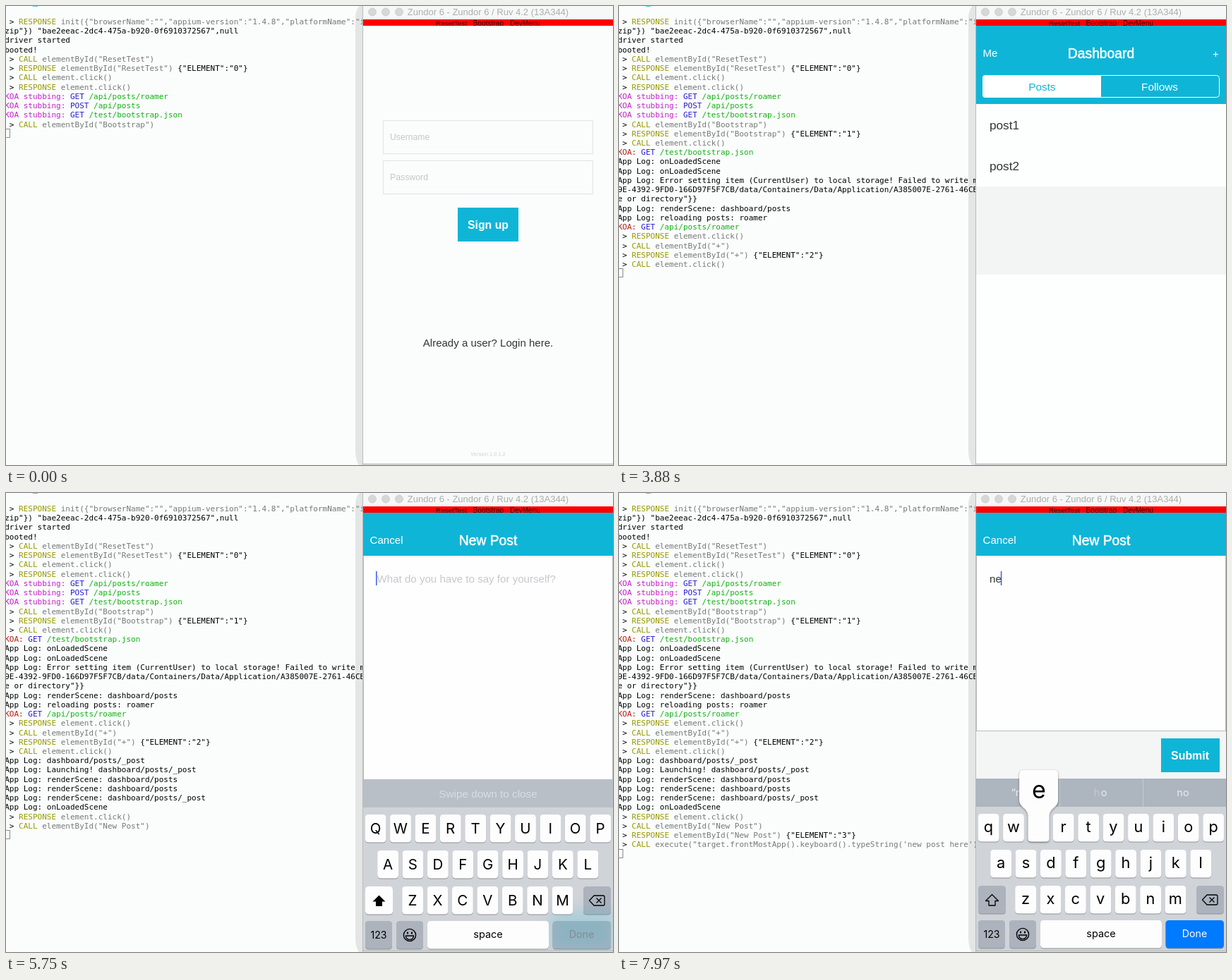
Write an HTML page with a canvas that moves like this. It is 860 px wide and 651 px high and loops after 8 s.

```html
<!DOCTYPE html>
<html lang="en">
<head>
<meta charset="utf-8">
<title>Terminal and simulator</title>
<style>
html, body { margin: 0; width: 100%; height: 100%; overflow: hidden; background: #fafdfc; }
canvas { display: block; }
</style>
</head>
<body>
<canvas id="stage" width="860" height="651"></canvas>
<script>
const ctx = document.getElementById('stage').getContext('2d');
const LOOP = 8000;
const SANS = '"Liberation Sans", Arial, sans-serif';
const KEYS = 'Inter, "Liberation Sans", sans-serif';
const MONO = '"DejaVu Sans Mono", Menlo, monospace';
const PAPER = '#fafdfc', CYAN = '#0fb5d7', INK = '#333536', DARK_KEY = '#adb3bd';
const BLACK = '#000', GREY = '#777', OLIVE = '#999900', GREEN = '#14b014',
      BLUE = '#2a1ed2', MAGENTA = '#c81ec8', RED = '#bb1a10';
const LEFT = 506, WIDTH = 354, MID = 683, BOTTOM = 649;
const KB_TOP = 405, KB_HEIGHT = 244;

// ---- drawing helpers ----
function rect(x, y, w, h, color) {
  ctx.fillStyle = color;
  ctx.fillRect(x, y, w, h);
}

function outline(x, y, w, h, color) {
  ctx.strokeStyle = color;
  ctx.lineWidth = 1;
  ctx.strokeRect(x + 0.5, y + 0.5, w - 1, h - 1);
}

function round(x, y, w, h, r, color) {
  ctx.fillStyle = color;
  ctx.beginPath();
  ctx.roundRect(x, y, w, h, r);
  ctx.fill();
}

function text(s, x, y, size, color, align = 'left', weight = '', family = SANS) {
  ctx.font = `${weight} ${size}px ${family}`;
  ctx.textAlign = align;
  ctx.fillStyle = color;
  ctx.fillText(s, x, y);
}

const keyText = (s, x, y, size, color = '#000') => text(s, x, y, size, color, 'center', '', KEYS);

function title(s, x) {
  text(s, x, 74, 19.3, '#fff', 'center');
  ctx.strokeStyle = '#fff';
  ctx.lineWidth = 0.5;
  ctx.strokeText(s, x, 74);
}

function layer(alpha, dx, draw) {
  ctx.save();
  ctx.globalAlpha *= alpha;
  ctx.translate(dx, 0);
  draw();
  ctx.restore();
}

function clip(x, y, w, h, draw) {
  ctx.save();
  ctx.beginPath();
  ctx.rect(x, y, w, h);
  ctx.clip();
  draw();
  ctx.restore();
}

// Value of the last [time, value] step that has begun.
const stepAt = (steps, t) => steps.reduce((v, [at, next]) => t >= at ? next : v, steps[0][1]);

// What is left of a critically damped spring, from 1 down to 0.
function spring(t, start, speed) {
  const p = Math.max(0, t - start) / 1000 * speed;
  return (1 + p) * Math.exp(-p);
}

// ---- terminal ----
const call = s => [[BLACK, ' > '], [OLIVE, 'CALL '], [GREY, s]];
const response = (s, result = '') =>
  [[BLACK, ' > '], [OLIVE, 'RESPONSE '], [GREY, s + ' '], [BLACK, result]];
const plain = s => [[BLACK, s]];
const log = s => plain('App Log: ' + s);
const stub = (verb, path) => [[MAGENTA, 'KOA stubbing: '], [BLUE, verb + ' '], [GREEN, path]];
const koa = path => [[RED, 'KOA: '], [BLUE, 'GET '], [GREEN, path]];
const find = id => `elementById("${id}")`;
const CLICK = 'element.click()';

const LINES = [
  response('init({"browserName":"","appium-version":"1.4.8","platformName":"i'),
  plain('zip"}) "bae2eeac-2dc4-475a-b920-0f6910372567",null'),
  plain('driver started'),
  plain('booted!'),
  call(find('ResetTest')),
  response(find('ResetTest'), '{"ELEMENT":"0"}'),
  call(CLICK),
  response(CLICK),
  stub('GET', '/api/posts/roamer'),
  stub('POST', '/api/posts'),
  stub('GET', '/test/bootstrap.json'),
  call(find('Bootstrap')),
  response(find('Bootstrap'), '{"ELEMENT":"1"}'),
  call(CLICK),
  koa('/test/bootstrap.json'),
  log('onLoadedScene'),
  log('onLoadedScene'),
  log('Error setting item (CurrentUser) to local storage! Failed to write m'),
  plain('9E-4392-9FD0-166D97F5F7CB/data/Containers/Data/Application/A385007E-2761-46CB'),
  plain('e or directory"}}'),
  log('renderScene: dashboard/posts'),
  log('reloading posts: roamer'),
  koa('/api/posts/roamer'),
  response(CLICK),
  call(find('+')),
  response(find('+'), '{"ELEMENT":"2"}'),
  call(CLICK),
  log('dashboard/posts/_post'),
  log('Launching! dashboard/posts/_post'),
  log('renderScene: dashboard/posts'),
  log('renderScene: dashboard/posts'),
  log('renderScene: dashboard/posts/_post'),
  log('onLoadedScene'),
  response(CLICK),
  call(find('New Post')),
  response(find('New Post'), '{"ELEMENT":"3"}'),
  call(`execute("target.frontMostApp().keyboard().typeString('new post here')")`)
];
const LINE_STEPS = [[0, 12], [620, 14], [1550, 15], [1640, 17], [1730, 20], [1810, 23],
  [1900, 25], [3880, 27], [4870, 28], [4960, 32], [5040, 35], [6200, 37]];

function terminal(t) {
  const count = stepAt(LINE_STEPS, t);
  const middle = i => Math.round(22 + 13.23 * i);
  rect(38, 0, 7, 1, '#5cc8dc');
  for (let i = 0; i < count; i++) {
    let x = -1.8;
    for (const [color, s] of LINES[i]) {
      text(s, x, middle(i) + 4, 11, color, 'left', '', MONO);
      x += ctx.measureText(s).width;
    }
  }
  outline(-1, middle(count) - 7, 7, 13, '#8a8c8c');
}

// ---- simulator window ----
function shadow() {
  ctx.fillStyle = '#e4e6e6';
  ctx.beginPath();
  ctx.moveTo(506, 0);
  ctx.lineTo(501, 0);
  ctx.quadraticCurveTo(495, 5, 495, 18);
  ctx.lineTo(495, 630);
  ctx.quadraticCurveTo(495, 644, 500, 651);
  ctx.lineTo(506, 651);
  ctx.fill();
}

function chrome(t) {
  rect(505, 0, 1, 651, '#b9bcbc');
  rect(LEFT, 0, WIDTH, 19, '#f6f7f7');
  for (const x of [519, 538, 557]) {
    ctx.beginPath();
    ctx.arc(x, 8.5, 5.5, 0, 7);
    ctx.fillStyle = '#d6d7d7';
    ctx.fill();
    ctx.strokeStyle = '#c9caca';
    ctx.lineWidth = 0.8;
    ctx.stroke();
  }
  text('Zundor 6 - Zundor 6 / Ruv 4.2 (13A344)', MID, 13, 13, '#acaeae', 'center');
  rect(LEFT, 19, WIDTH, 9, '#fe0000');
  clip(LEFT, 19, WIDTH, 9, () => {
    text('ResetTest', 609, 28, 9.9, '#300');
    layer(stepAt([[0, 1], [1550, 0.3], [1640, 0.5], [1730, 0.8], [1810, 1]], t), 0,
      () => text('Bootstrap', 661.5, 28, 10.2, '#300'));
    text('DevMenu', 714, 28, 10, '#300');
  });
  rect(LEFT, BOTTOM, WIDTH, 1, '#b5b8b8');
  rect(LEFT, BOTTOM + 1, WIDTH, 1, '#dfe1e1');
}

// ---- screens ----
function login() {
  rect(LEFT, 28, WIDTH, 621, PAPER);
  outline(534, 162, 298, 48, '#e0e3e3');
  outline(534, 219, 298, 48, '#e0e3e3');
  text('Username', 544, 190, 12.2, '#c4c7c7');
  text('Password', 544, 247, 12.3, '#c4c7c7');
  rect(640, 286, 86, 48, CYAN);
  text('Sign up', MID, 316, 15.8, '#fff', 'center', 'bold');
  text('Already a user? Login here.', MID, 483, 15, INK, 'center');
  text('Version 1.0.1.2', MID, 638, 7.4, '#d0d3d3', 'center');
}

function dashboard(hasPosts) {
  rect(LEFT, 28, WIDTH, 621, '#fdfefe');
  rect(LEFT, 28, WIDTH, 111, CYAN);
  ctx.strokeStyle = '#fff';
  ctx.lineWidth = 1;
  ctx.beginPath();
  ctx.roundRect(515.5, 98.5, 335, 31, 4);
  ctx.stroke();
  round(515, 98, 168, 32, [4, 0, 0, 4], '#fff');
  text('Posts', 599.5, 120, 15.3, CYAN, 'center');
  text('Follows', 766, 120, 15.3, '#fff', 'center');
  rect(LEFT, 256, WIDTH, 125, '#f3f4f4');
  if (hasPosts) {
    text('post1', 525, 175, 17.2, INK);
    text('post2', 525, 233, 17.2, INK);
  }
}

function dashboardBar(plusAlpha) {
  text('Me', 515.5, 72, 15.1, '#fff');
  title('Dashboard', MID);
  layer(plusAlpha, 0, () => text('+', 845.5, 73, 15, '#fff', 'center'));
}

const TYPED = [[0, ''], [7540, 'n'], [7970, 'ne']];
const CARET = [[0, 1], [6370, 0.5], [6460, 0], [6820, 0.85], [6910, 0.95], [7000, 1]];

function composer(t, barTop) {
  const typed = stepAt(TYPED, t);
  rect(LEFT, 89, WIDTH, barTop - 89, '#fefefe');
  rect(LEFT, barTop, WIDTH, BOTTOM - barTop, '#f4f5f5');
  outline(LEFT, 88, WIDTH, barTop - 88, '#b9bcbc');
  if (typed) text(typed, 525, 127, 15.1, INK);
  else text('What do you have to say for yourself?', 525.5, 127, 15.1, '#c6c8ca');
  const caretX = typed ? 524 + typed.length * 8.4 : 524;
  layer(stepAt(CARET, t), 0, () => rect(caretX, 111, 1.6, 20, '#4668e2'));
  rect(768, barTop + 10, 83, 48, CYAN);
  text('Submit', 809, barTop + 40, 15.9, '#fff', 'center', 'bold');
}

// ---- keyboard ----
const PITCH = 35.4;
const ROWS = [['QWERTYUIOP', 523.5, 50], ['ASDFGHJKL', 541, 101], ['ZXCVBNM', 576, 152]];

function key(x, y, w, color) {
  round(x, y + 1, w, 39.5, 4.5, '#8d9198');
  round(x, y, w, 39.5, 4.5, color);
}

function arrow(filled) {
  ctx.beginPath();
  const side = [[0, 0], [9, 9], [4.5, 9], [4.5, 15.5]];
  side.forEach(([x, y]) => ctx.lineTo(528.5 + x, 164.5 + y));
  side.reverse().forEach(([x, y]) => ctx.lineTo(528.5 - x, 164.5 + y));
  ctx.closePath();
  ctx.lineJoin = 'round';
  ctx.lineWidth = 1.3;
  ctx.strokeStyle = ctx.fillStyle = '#000';
  if (filled) ctx.fill();
  else ctx.stroke();
}

function deleteIcon() {
  ctx.strokeStyle = '#000';
  ctx.lineWidth = 1.3;
  ctx.lineJoin = 'round';
  ctx.beginPath();
  ctx.moveTo(826.5, 172);
  ctx.lineTo(833, 165);
  ctx.lineTo(846, 165);
  ctx.quadraticCurveTo(848, 165, 848, 167);
  ctx.lineTo(848, 177);
  ctx.quadraticCurveTo(848, 179, 846, 179);
  ctx.lineTo(833, 179);
  ctx.closePath();
  ctx.moveTo(836.5, 168.5);
  ctx.lineTo(843.5, 175.5);
  ctx.moveTo(843.5, 168.5);
  ctx.lineTo(836.5, 175.5);
  ctx.stroke();
}

function smiley() {
  ctx.strokeStyle = ctx.fillStyle = '#000';
  ctx.lineWidth = 1.4;
  ctx.beginPath();
  ctx.arc(572, 221, 8.6, 0, 7);
  ctx.stroke();
  for (const x of [569, 575]) {
    ctx.beginPath();
    ctx.ellipse(x, 218, 1.1, 1.7, 0, 0, 7);
    ctx.fill();
  }
  ctx.beginPath();
  ctx.arc(572, 222, 5.6, 0, Math.PI);
  ctx.closePath();
  ctx.stroke();
}

function callout(letter) {
  const [letters, x0, y] = ROWS.find(([row]) => row.includes(letter.toUpperCase()));
  const x = x0 + letters.indexOf(letter.toUpperCase()) * PITCH;
  ctx.save();
  ctx.translate(x + 0.3, y);
  ctx.beginPath();
  ctx.moveTo(-22, -62);
  ctx.lineTo(22, -62);
  ctx.quadraticCurveTo(27.5, -62, 27.5, -56);
  ctx.lineTo(27.5, -20);
  ctx.bezierCurveTo(27.5, -8, 15, -9, 15, 4);
  ctx.lineTo(15, 35);
  ctx.quadraticCurveTo(15, 39.5, 10.5, 39.5);
  ctx.lineTo(-10.5, 39.5);
  ctx.quadraticCurveTo(-15, 39.5, -15, 35);
  ctx.lineTo(-15, 4);
  ctx.bezierCurveTo(-15, -9, -27.5, -8, -27.5, -20);
  ctx.lineTo(-27.5, -56);
  ctx.quadraticCurveTo(-27.5, -62, -22, -62);
  ctx.shadowColor = 'rgba(0,0,0,.4)';
  ctx.shadowBlur = 3;
  ctx.shadowOffsetY = 1;
  ctx.fillStyle = '#fdfdfd';
  ctx.fill();
  ctx.restore();
  keyText(letter, x + 0.5, y - 22, 34);
}

function suggestions() {
  const color = '#e9ecef';
  rect(624, 0, 1, 40, '#c3c9d0');
  rect(742, 0, 1, 40, '#c3c9d0');
  keyText('“n”', 566, 25, 14.5, color);
  layer(0.4, 0, () => keyText('h', 677, 25, 14.5, color));
  keyText('o', 687, 25, 14.5, color);
  keyText('no', 799, 25, 14.5, color);
}

function keyboard(t, top, barTop) {
  const lower = t >= 7270, typed = stepAt(TYPED, t) !== '';
  ctx.save();
  ctx.translate(0, top);
  rect(LEFT, 0, WIDTH, KB_HEIGHT, '#d0d4d9');
  rect(LEFT, 0, WIDTH, 40, typed ? '#adb5be' : '#b8bfc7');
  if (typed) suggestions();
  else text('Swipe down to close', MID, 26, 15.3, '#d9dde1', 'center');

  if (lower) key(509, 152, 39, DARK_KEY);
  key(818, 152, 39, DARK_KEY);
  key(509, 201, 38, DARK_KEY);
  key(553, 201, 38, DARK_KEY);
  key(774.5, 201, 82.5, typed ? '#007aff' : DARK_KEY);

  // The submit button shows through while it lies behind.
  if (barTop > KB_TOP - 58) {
    clip(LEFT, 0, WIDTH, KB_HEIGHT, () => {
      ctx.filter = 'blur(10px)';
      ctx.globalAlpha = 0.2;
      rect(772, barTop + 10 - top, 88, 56, CYAN);
    });
  }

  if (!lower) key(509, 152, 39, '#fdfdfd');
  for (const [letters, x0, y] of ROWS) {
    [...letters].forEach((c, i) => {
      const x = x0 + i * PITCH;
      key(x - 14.8, y, 29.8, '#fdfdfd');
      keyText(lower ? c.toLowerCase() : c, x, y + (lower ? 26 : 27), lower ? 21.8 : 20.5);
    });
  }
  key(597, 201, 172, '#fdfdfd');
  arrow(!lower);
  deleteIcon();
  smiley();
  keyText('123', 528, 226, 14.2);
  keyText('space', MID, 225, 14.5);
  keyText('Done', 815.5, 225, 14.2, typed ? '#fff' : '#848b95');

  const pressed = stepAt([[0, ''], [7450, 'n'], [7630, ''], [7970, 'e']], t);
  if (pressed) callout(pressed);
  ctx.restore();
}

function phone(t) {
  if (t < 1640) return login();
  const hasPosts = t >= 1810;
  if (t < 5300) {
    dashboard(hasPosts);
    return dashboardBar(stepAt([[0, 1], [4870, 0.3], [4960, 0.5], [5040, 0.8]], t));
  }
  // The screen refreshes every 90 ms during the transition.
  const tick = 5300 + Math.floor((t - 5300) / 90) * 90;
  const left = tick < 5570 ? spring(tick, 5210, 25) : 0;
  const lift = tick < 6020 ? spring(tick, 5750, 28) : 0;
  const rise = tick < 5840 ? spring(tick, 5351.6, 18.3) : 0;
  const barTop = Math.round(338 + KB_HEIGHT * lift);
  const kbTop = Math.round(KB_TOP + KB_HEIGHT * rise);

  rect(LEFT, 28, WIDTH, 621, '#fdfefe');
  if (left) layer(Math.min(1, 0.12 + left * 2), -106 * (1 - left), () => dashboard(true));
  layer(1, Math.round(WIDTH * left), () => composer(t, barTop));
  rect(LEFT, 28, WIDTH, 61, CYAN);
  if (left > 0.02) layer(left, -60 * (1 - left), () => dashboardBar(1));
  layer(1 - left, 0, () => {
    text('Cancel', 515.5, 72, 15.1, '#fff');
    title('New Post', MID + 100 * left);
  });
  if (kbTop < BOTTOM) keyboard(t, kbTop, barTop);
}

function draw(now) {
  const t = now % LOOP;
  rect(0, 0, 860, 651, PAPER);
  shadow();
  terminal(t);
  clip(LEFT, 28, WIDTH, BOTTOM - 28, () => phone(t));
  chrome(t);
  requestAnimationFrame(draw);
}
requestAnimationFrame(draw);
</script>
</body>
</html>
```
